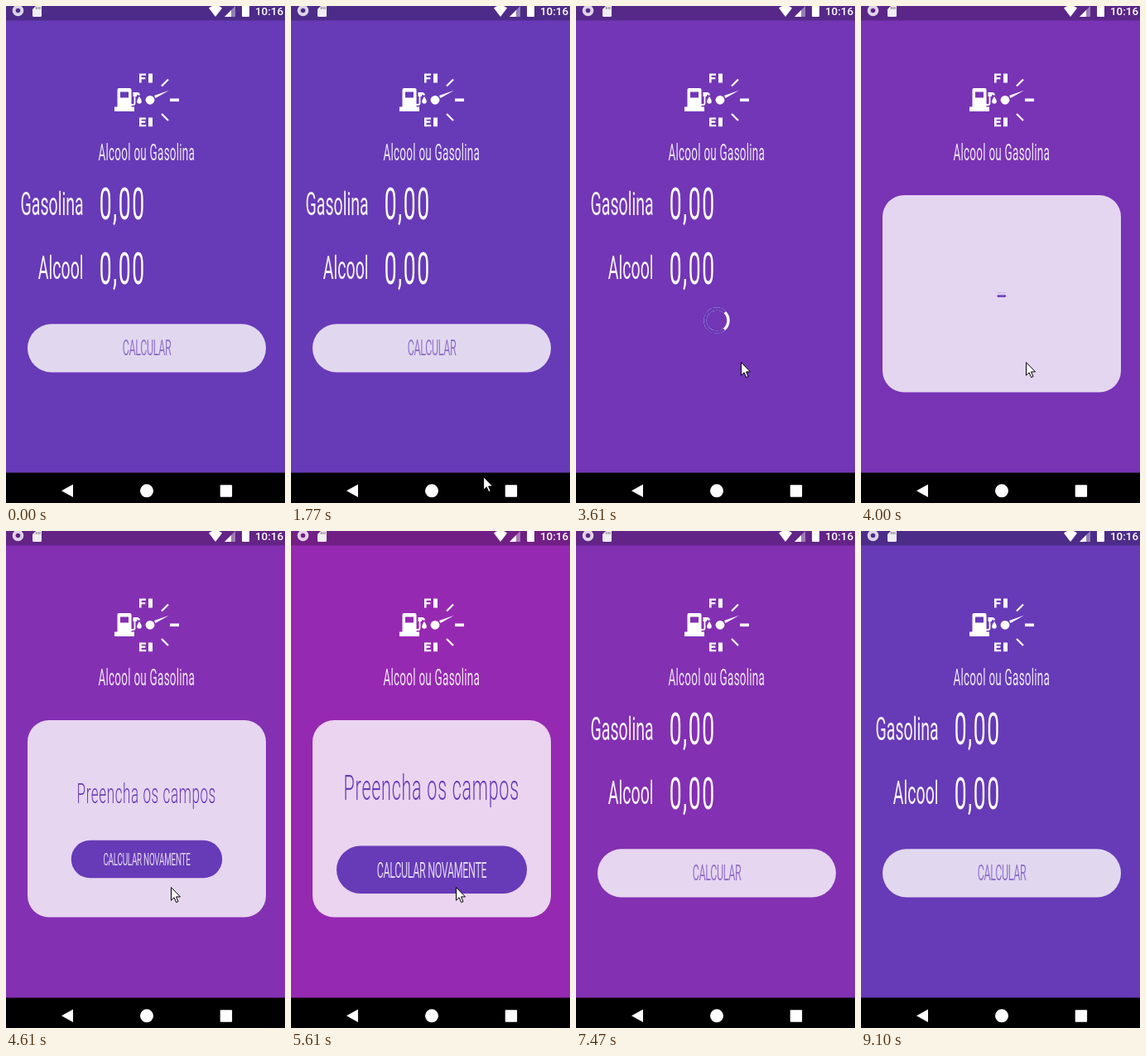
Recreate the animation shown at these times as an HTML page. Size 337 by 599 pixels, loop 9.33 s.

```html
<!DOCTYPE html>
<html lang="pt">
<head>
<meta charset="utf-8">
<title>Alcool ou Gasolina</title>
<style>
  html, body { margin: 0; width: 100%; height: 100%; overflow: hidden; background: #000; }
  svg { display: block; width: 337px; height: 599px; }
  text { font-family: Roboto, "Open Sans", sans-serif; fill: #fff; }
  .mid { text-anchor: middle; }
  .end { text-anchor: end; }
  .primary { fill: #673ab7; }
  .soft { fill: #fff; fill-opacity: .8; }
  .clock { font-size: 13.4px; font-weight: 500; }
  .title { font-size: 27px; letter-spacing: .5px; fill-opacity: .87; }
  .label { font-size: 39px; fill-opacity: .93; }
  .value { font-size: 53px; letter-spacing: 3px; }
  .button { font-size: 25px; letter-spacing: -.7px; }
  .faint { fill-opacity: .65; }
  .result { font-size: 43px; font-weight: 300; letter-spacing: 1.5px; }
</style>
</head>
<body>
<svg viewBox="0 0 337 599">
  <rect id="page" width="337" height="563"/>
  <rect width="337" height="17.5" opacity=".25"/>

  <g id="status" fill="#fff">
    <circle cx="14.5" cy="5.5" r="4.8" fill="none" stroke="#fff" stroke-width="4" opacity=".8"/>
    <path d="M32 4L36 0H43V11.5Q43 13 41.5 13H33.5Q32 13 32 11.5Z" opacity=".92"/>
    <path d="M36.5 1V4M38.8 1V4M41 1V4" stroke="#777" stroke-width="1"/>
    <path d="M245 2.5Q253 -4 261 2.5L253 13Z"/>
    <path d="M264 13L277 0V13Z" opacity=".4"/>
    <path d="M264 13L272 5V13Z"/>
    <path d="M285 0H294V12Q294 13 293 13H286Q285 13 285 12Z"/>
    <text class="clock end" x="335" y="11">10:16</text>
  </g>

  <g id="gauge" fill="#fff" stroke="#fff" stroke-width="0">
    <path fill-rule="evenodd" d="M136.5 99H149.5Q151.5 99 151.5 101V121.5H155V127H131V121.5H134.5V101Q134.5 99 136.5 99ZM138 103.5V110.5H148V103.5Z"/>
    <path d="M151 119H153.5Q155.5 119 155.5 117V107" fill="none" stroke-width="1.8"/>
    <path d="M153.5 104H158.5Q161.5 104 162 107.5H159.5L158 106.8V109H153.5Z"/>
    <path d="M161 109Q163.8 113 163.8 115A2.8 2.8 0 0 1 158.2 115Q158.2 113 161 109Z"/>
    <circle cx="174" cy="113.3" r="5.4"/>
    <path d="M179 108L197 101.8L180.5 111Z"/>
    <path d="M188 96.5L196 88.5M188 130L196 138" stroke-width="2.2"/>
    <path d="M198 113.3H209" stroke-width="3.6"/>
    <path d="M161 81.5H169V83.8H163.6V86H168.3V88.2H163.6V92.5H161ZM172 81.5H177V92.5H172Z"/>
    <path d="M161 134.5H169V136.8H163.6V138.6H168.3V140.8H163.6V143H169.2V145.3H161ZM172 134.5H177V145.3H172Z"/>
  </g>

  <text class="title mid" transform="translate(169.8 186) scale(.5 1)">Alcool ou Gasolina</text>

  <g id="form">
    <text class="label end" transform="translate(93.5 251.5) scale(.5 1)">Gasolina</text>
    <text class="value" transform="translate(112.7 257) scale(.5 1)">0,00</text>
    <text class="label end" transform="translate(93.5 329) scale(.5 1)">Alcool</text>
    <text class="value" transform="translate(112.7 334.5) scale(.5 1)">0,00</text>
    <g id="submit">
      <rect class="soft" x="26" y="383.2" width="288" height="58.3" rx="29.1"/>
      <text class="button mid primary faint" transform="translate(170 421) scale(.5 1)">CALCULAR</text>
    </g>
    <g id="spinner" fill="none" stroke-width="3.4">
      <circle cx="170" cy="379" r="14" stroke="#fff"/>
      <path id="arc" stroke="#673ab7"/>
    </g>
  </g>

  <g id="card">
    <rect class="soft" x="26" y="228" width="288" height="237.5" rx="26"/>
    <g id="answer">
      <text class="result mid primary" transform="translate(169.7 323.5) scale(.5 1)">Preencha os campos</text>
      <rect class="primary" x="55" y="379.5" width="230" height="57.5" rx="28.7"/>
      <text class="button mid soft" transform="translate(170 418) scale(.5 1)">CALCULAR NOVAMENTE</text>
    </g>
  </g>

  <rect y="562.5" width="337" height="37"/>
  <g fill="#fff">
    <path d="M67 584.3L81 576.5V592Z"/>
    <circle cx="170" cy="584.3" r="8"/>
    <rect x="258.7" y="577.3" width="14.4" height="14.4" rx="1"/>
  </g>

  <path id="cursor" d="M.5 .5V16.2L4.1 12.8L6.7 18.6L9 17.5L6.5 11.9H11.5Z" fill="#fff" stroke="#000"/>
</svg>

<script>
const LOOP = 9330;
const BUSY = 3000, DONE = 3950, RESET = 6070;
const TINT_IN = 2970, TINT_OUT = 6070, TINT_TIME = 3000;
const CENTER = [169.8, 346.7];
const deepPurple = [103, 58, 183], purple = [156, 39, 176];

const el = id => document.getElementById(id);
const clamp = x => Math.min(1, Math.max(0, x));
const progress = (t, start, length) => clamp((t - start) / length);
const smooth = x => x * x * (3 - 2 * x);
const mix = (a, b, k) => a + (b - a) * k;
const show = (id, on) => el(id).setAttribute('display', on ? 'inline' : 'none');

// Pointer path as [time, x, y]
const pointer = [
  [1640, 247, 592], [1860, 222, 550], [2090, 189, 468], [2310, 199, 429],
  [5840, 199, 429], [6000, 199, 421], [6840, 199, 421], [7450, 214, 600]
];

function pointerAt(t) {
  const i = pointer.findIndex(p => p[0] > t);
  if (i < 1) return null;
  const [a, b] = [pointer[i - 1], pointer[i]];
  const k = (t - a[0]) / (b[0] - a[0]);
  return [mix(a[1], b[1], k), mix(a[2], b[2], k)];
}

function spinnerArc(t) {
  const u = t / 1333;
  const head = smooth(clamp(u * 2)), tail = smooth(clamp(u * 2 - 1));
  const start = Math.PI * (-.5 + tail * 1.5 + u * 1.7);
  const sweep = Math.max(.001, (head - tail) * 1.5 * Math.PI);
  const point = a => `${170 + 14 * Math.cos(a)} ${379 + 14 * Math.sin(a)}`;
  return `M${point(start)}A14 14 0 ${+(sweep > Math.PI)} 1 ${point(start + sweep)}`;
}

function render(t) {
  const tint = progress(t, TINT_IN, TINT_TIME) - progress(t, TINT_OUT, TINT_TIME);
  const color = deepPurple.map((c, i) => Math.round(mix(c, purple[i], tint)));
  el('page').setAttribute('fill', `rgb(${color})`);

  const busy = t >= BUSY && t < DONE;
  const done = t >= DONE && t < RESET;
  show('form', !done);
  show('submit', !busy);
  show('spinner', busy);
  show('card', done);
  if (busy) el('arc').setAttribute('d', spinnerArc(t - BUSY));
  if (done) {
    const s = progress(t, 3963, 817);
    const [x, y] = CENTER;
    el('answer').setAttribute('transform', `translate(${x} ${y}) scale(${s}) translate(${-x} ${-y})`);
  }

  const at = pointerAt(t);
  show('cursor', at);
  if (at) el('cursor').setAttribute('transform', `translate(${at})`);
}

const began = performance.now();
function tick() {
  render((performance.now() - began) % LOOP);
  requestAnimationFrame(tick);
}
tick();
</script>
</body>
</html>
```
